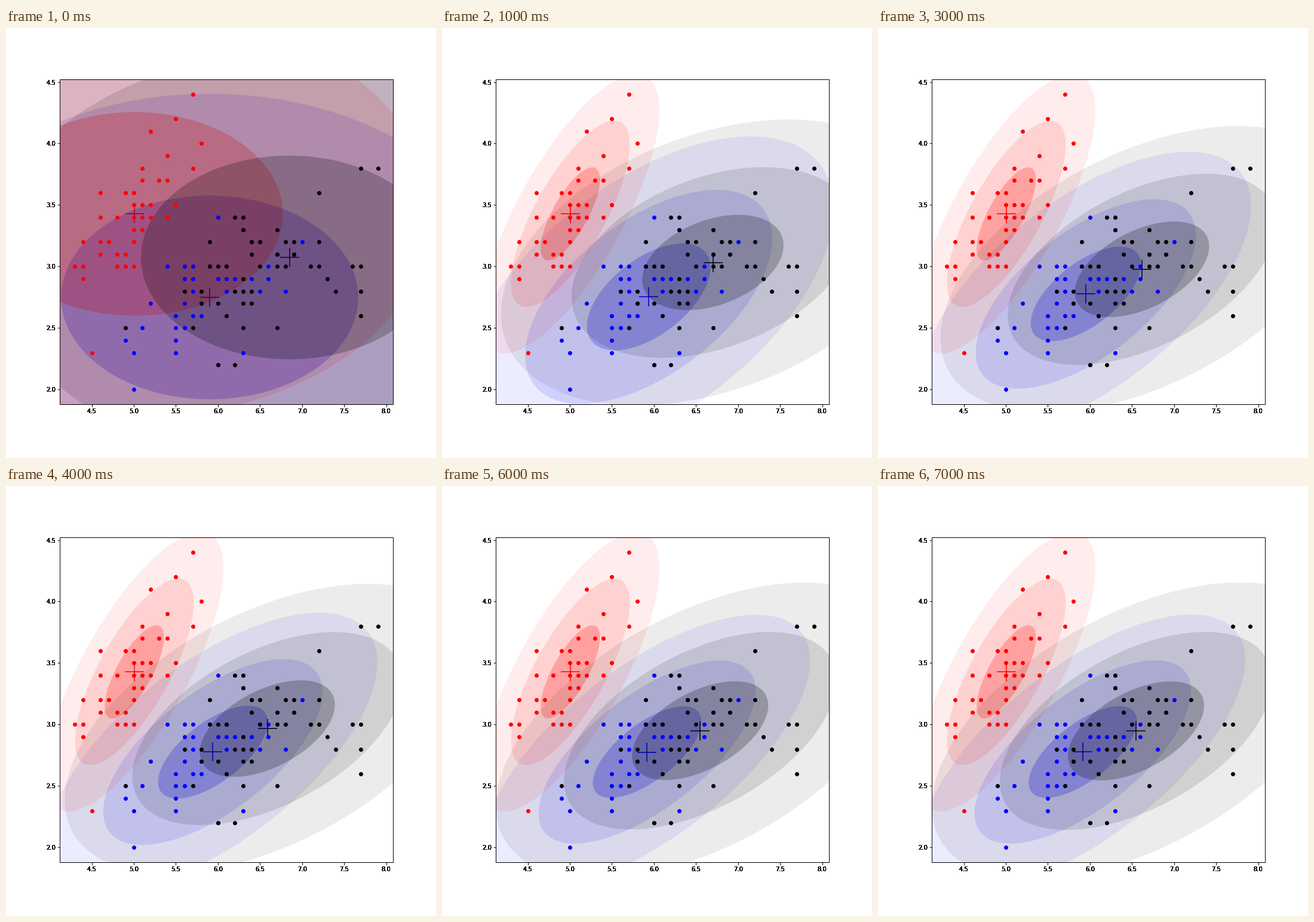
A matplotlib script for the animation above (8000 ms loop, 720 px wide and 720 px high).

```python
import numpy as np
import matplotlib.pyplot as plt
from matplotlib.animation import FuncAnimation
from matplotlib.patches import Polygon

BOX = [0.125, 0.125, 0.775, 0.755]
X_LIM, Y_LIM = (4.12, 8.08), (1.88, 4.52)
ALPHA = 0.225
LABEL_LAYERS = 8  # stacked axes give the heavy tick labels

# Samples in tenths, grouped by row: {y: [x, ...]}
SAMPLES = {
    "red": {
        44: [57], 42: [55], 41: [52], 40: [58], 39: [54], 38: [51, 57],
        37: [51, 53, 54], 36: [46, 49, 50], 35: [50, 51, 52, 55],
        34: [46, 48, 50, 51, 52, 54], 33: [50, 51], 32: [44, 46, 47, 50],
        31: [46, 48, 49], 30: [43, 44, 48, 49, 50], 29: [44], 23: [45],
    },
    "blue": {
        34: [60], 33: [63], 32: [64, 70], 31: [67, 69],
        30: [54, 56, 57, 59, 61, 66], 29: [56, 57, 60, 61, 62, 64, 66],
        28: [57, 61, 65, 68], 27: [52, 56, 58], 26: [55, 57, 58],
        25: [51, 55, 56], 24: [49, 55], 23: [50, 55, 63], 22: [60], 20: [50],
    },
    "black": {
        38: [77, 79], 36: [72], 34: [62, 63], 33: [63, 67],
        32: [59, 64, 65, 68, 69, 72], 31: [64, 67, 69],
        30: [59, 60, 61, 65, 67, 68, 71, 72, 76, 77], 29: [63, 73],
        28: [56, 58, 62, 63, 64, 74, 77], 27: [58, 60, 63, 64],
        26: [61, 77], 25: [49, 57, 63, 67], 22: [60, 62],
    },
}

# Fit per key step: mean x, mean y, sd x, sd y, correlation
KEY_STEPS = [0, 1, 2, 3, 5, 6, 7]
START_SD = (1.7653, 0.8281, 0)
RED_FIT = (5.006, 3.428, 0.3525, 0.3785, 0.7425)
FITS = {
    "blue": [
        (5.9016, 2.7484, *START_SD),
        (5.937, 2.753, 0.734, 0.435, 0.55),
        (5.949, 2.774, 0.673, 0.413, 0.55),
        (5.951, 2.7775, 0.654, 0.385, 0.62),
        (5.928, 2.775, 0.649, 0.370, 0.67),
        (5.919, 2.776, 0.645, 0.372, 0.67),
        (5.915, 2.777, 0.643, 0.3725, 0.67),
    ],
    "red": [(5.006, 3.428, *START_SD)] + [RED_FIT] * 6,
    "black": [
        (6.85, 3.0737, *START_SD),
        (6.700, 3.033, 0.8395, 0.3875, 0.36),
        (6.686, 3.002, 0.769, 0.3835, 0.43),
        (6.618, 2.9775, 0.798, 0.3885, 0.48),
        (6.5555, 2.9565, 0.8075, 0.396, 0.51),
        (6.549, 2.950, 0.809, 0.4015, 0.51),
        (6.547, 2.948, 0.809, 0.4025, 0.51),
    ],
}


def fit_at(color, step):
    return [np.interp(step, KEY_STEPS, column) for column in zip(*FITS[color])]


def contour(fit, sigmas):
    mx, my, sx, sy, rho = fit
    t = np.linspace(0, 2 * np.pi, 240, endpoint=False)
    x = np.cos(t)
    y = rho * x + np.sqrt(1 - rho**2) * np.sin(t)
    return np.column_stack([mx + sigmas * sx * x, my + sigmas * sy * y])


def add_axes(layer):
    axes = fig.add_axes(BOX, label=f"layer {layer}", facecolor="none")
    axes.set(xlim=X_LIM, ylim=Y_LIM)
    axes.set_xticks(np.arange(4.5, 8.1, 0.5))
    axes.set_yticks(np.arange(2.0, 4.6, 0.5))
    return axes


fig = plt.figure(figsize=(10, 10), dpi=72, facecolor="white")
ax = [add_axes(i) for i in range(LABEL_LAYERS)][0]

for color, rows in SAMPLES.items():
    points = [(x / 10, y / 10) for y, xs in rows.items() for x in xs]
    ax.plot(*zip(*points), "o", color=color, markersize=6, zorder=2)

crosses, ellipses = {}, {}
for color in FITS:
    fit = fit_at(color, 0)
    crosses[color] = ax.scatter(*fit[:2], s=1000, marker="+", color=color,
                                linewidth=1.5, zorder=0.5)
    for n in (1, 2, 3):
        patch = Polygon(contour(fit, n), facecolor=color, alpha=ALPHA / n,
                        linewidth=0, zorder=1)
        ellipses[color, n] = ax.add_patch(patch)


def update(step):
    for color, cross in crosses.items():
        cross.set_offsets([fit_at(color, step)[:2]])
    for (color, n), patch in ellipses.items():
        patch.set_xy(contour(fit_at(color, step), n))
    return [*crosses.values(), *ellipses.values()]


anim = FuncAnimation(fig, update, frames=8, interval=1000, repeat=True)
plt.show()
```
